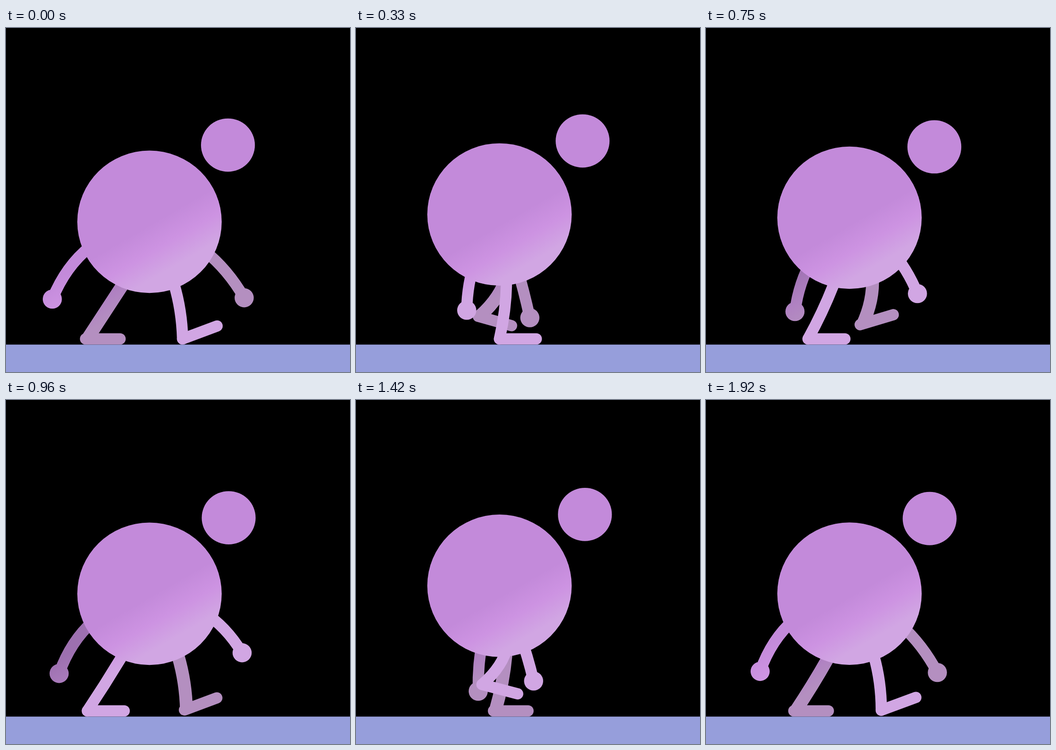
An HTML page with a canvas that plays this animation: 748 by 748 pixels, repeating every 1.96 s.

```html
<!DOCTYPE html>
<html>
<head>
<meta charset="utf-8">
<style>
html, body { margin: 0; width: 100%; height: 100%; overflow: hidden; background: #000; }
canvas { display: block; }
</style>
</head>
<body>
<canvas id="stage" width="748" height="748"></canvas>
<script>
const ctx = document.getElementById('stage').getContext('2d');
const CYCLE = 48, STEP = 24, LOOP = 1960, DEG = Math.PI / 180;
const { sin, cos, floor, hypot } = Math;

// Symmetric ease with handles of length c
function ease(x, c) {
  let lo = 0, hi = 1;
  for (let i = 0; i < 30; i++) {
    const s = (lo + hi) / 2, r = 1 - s;
    if (3 * c * s * r * r + 3 * (1 - c) * s * s * r + s ** 3 < x) lo = s; else hi = s;
  }
  return lo * lo * (3 - 2 * lo);
}

// Eased keys [time, value]
function tween(keys, n, c) {
  let i = 0;
  while (i < keys.length - 2 && n >= keys[i + 1][0]) i++;
  const [a, u] = keys[i], [b, v] = keys[i + 1];
  return u + (v - u) * ease((n - a) / (b - a), c);
}

// Shading runs diagonally across the whole stage
function shade(from, mid, to, colors) {
  const g = ctx.createLinearGradient(from / 2, .866 * from, to / 2, .866 * to);
  [0, (mid - from) / (to - from), 1].forEach((s, i) => g.addColorStop(s, colors[i]));
  return g;
}
const nearFill = shade(527, 580, 632, ['#c38ada', '#cd93e2', '#d1a6e3']);
const farFill = shade(545, 618, 662, ['#9d70b0', '#b082c2', '#b48fc0']);

// Arm swing in degrees from straight down, with an uneven pace (skew, drag)
const nearArm = { mid: 3.25, swing: -54.75, skew: 4, drag: 6, reach: 220, front: 20, back: 50 };
const farArm = { mid: 1, swing: 50.25, skew: -4, drag: -18, reach: 234, front: 30, back: 30 };

function ellipse(x, y, rx, ry = rx) {
  ctx.beginPath();
  ctx.ellipse(x, y, rx, ry, 0, 0, 7);
  ctx.fill();
}

function line(width, cap, draw) {
  ctx.lineWidth = width;
  ctx.lineCap = cap;
  ctx.beginPath();
  draw();
  ctx.stroke();
}

// Curved limb; bend is the sideways offset of the control point
function limb(x, y, x2, y2, bend, width, cap) {
  const dx = x2 - x, dy = y2 - y, k = bend / hypot(dx, dy);
  line(width, cap, () => {
    ctx.moveTo(x, y);
    ctx.quadraticCurveTo((x + x2) / 2 + dy * k, (y + y2) / 2 - dx * k, x2, y2);
  });
}

function leg(n, bodyY, far) {
  n %= CYCLE;
  let x = 384 - 9 * n, y = 676;
  if (n > STEP) {
    x = tween([[24, 168], [36, 277], [48, 384]], n, .66);
    y = tween([[24, 676], [36, 617], [48, 676]], n, .66);
  }
  const tilt = DEG * tween([[0, -20.5], [6, 0], [24, 0], [30, 16], [48, -20.5]], n, .8);
  const heel = far ? 5 : 0, shift = far ? 9 : 0;
  const hipX = 316 + shift, hipY = bodyY + 25, ankleX = x + shift;
  // The further the leg is stretched, the straighter it gets
  const bend = .9 * (275 - hypot(ankleX - hipX, y - hipY));
  limb(hipX, hipY, ankleX, y, bend, far ? 28 : 24.6, far ? 'butt' : 'round');
  line(24.6, 'round', () => {
    for (const d of [heel, 80]) ctx.lineTo(x + d * cos(tilt), y + d * sin(tilt));
  });
}

function arm({ mid, swing, skew, drag, reach, front, back }, n, bodyY) {
  const c = cos(n * 7.5 * DEG), angle = mid + swing * c + (1 - c * c) * (skew + drag * c);
  const length = reach + (front + (back - front) * (1 + c) / 2) * c ** 8;
  const x = 312 + length * sin(angle * DEG), y = bodyY + length * cos(angle * DEG);
  limb(312, bodyY, x, y, 1.24 * angle - 12, 24.5, 'round');
  ellipse(x, y, 20.8);
}

function head(n, bodyY) {
  const angle = DEG * (41.5 + 3.3 * cos((n - 2) * 15 * DEG));
  const dist = 240.4 - 1.8 * cos(n * 15 * DEG);
  ellipse(312 + dist * cos(angle), bodyY - dist * sin(angle), 58.6, 57.9);
}

function draw(n) {
  const bodyY = tween([[0, 421.4], [12, 403.6], [24, 421.4]], n % STEP, .8);
  ctx.fillStyle = '#000';
  ctx.fillRect(0, 0, 748, 748);
  ctx.fillStyle = '#969edb';
  ctx.fillRect(0, 688.4, 748, 60);

  ctx.fillStyle = ctx.strokeStyle = farFill;
  arm(farArm, n, bodyY);
  leg(n + STEP, bodyY, true);

  ctx.fillStyle = ctx.strokeStyle = nearFill;
  ellipse(312, bodyY, 157, 154.8);
  head(n, bodyY);
  arm(nearArm, n, bodyY);
  leg(n, bodyY, false);
}

const start = performance.now();
function tick() {
  const t = (performance.now() - start) % LOOP;
  // 24 pictures a second, each starting on a whole hundredth
  draw(floor((floor(t / 10) + .499) * .24));
  requestAnimationFrame(tick);
}
tick();
</script>
</body>
</html>
```
